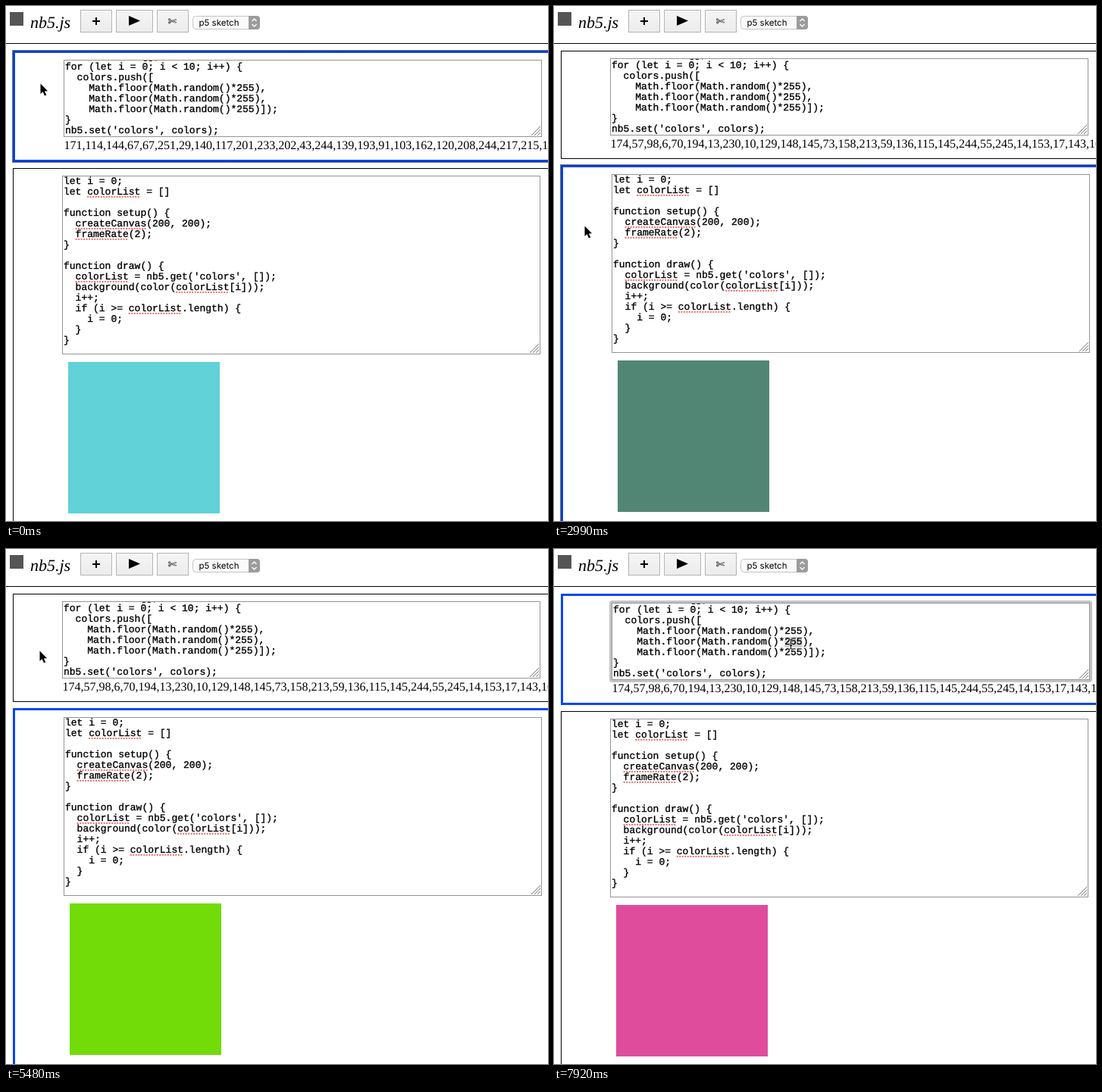
An HTML page with a canvas that plays this animation: 715 by 680 pixels, repeating every 8 s.

```html
<!DOCTYPE html>
<html lang="en">
<head>
<meta charset="utf-8">
<title>nb5.js notebook</title>
<style>
  html, body { margin: 0; width: 100%; height: 100%; overflow: hidden; background: #fff; }
  canvas { display: block; width: 715px; height: 680px; }
</style>
</head>
<body>
<canvas id="stage" width="715" height="680"></canvas>
<script>
const ctx = document.getElementById('stage').getContext('2d');
const LOOP = 8000, CHAR = 7.8, LINE = 14, BLUE = '#0647ee';
const MONO = '13px "Liberation Mono", monospace';

const listCode = `let colors = [];
for (let i = 0; i < 10; i++) {
  colors.push([
    Math.floor(Math.random()*255),
    Math.floor(Math.random()*255),
    Math.floor(Math.random()*255)]);
}
nb5.set('colors', colors);`;

const sketchCode = `let i = 0;
let colorList = []

function setup() {
  createCanvas(200, 200);
  frameRate(2);
}

function draw() {
  colorList = nb5.get('colors', []);
  background(color(colorList[i]));
  i++;
  if (i >= colorList.length) {
    i = 0;
  }
}`;

const oldList = '171,114,144,67,67,251,29,140,117,201,233,202,43,244,139,193,91,103,162,120,208,244,217,215,1';
const newList = '174,57,98,6,70,194,13,230,10,129,148,145,73,158,213,59,136,115,145,244,55,245,14,153,17,143,16';

// Sketch background: start time and colour
const swatches = [
  [0, '#60d2d8'], [50, '#8a8f88'], [560, '#a0798f'], [1060, '#2d60f9'],
  [1480, '#408976'], [2010, '#d0e7cb'], [2520, '#5a9dd3'], [2990, '#528674'],
  [3480, '#b0ec3e'], [3840, '#fff'], [4470, '#9f4c62'], [4960, '#0a53c0'],
  [5480, '#72dc08'], [5960, '#849290'], [6440, '#5a9dd3'], [6940, '#528674'],
  [7430, '#b0ec3e'], [7920, '#de4c9b']
];

// Pointer: time, x, y
const pointerPath = [
  [0, 45, 102], [810, 45, 102], [1360, 163, 22], [2200, 163, 22],
  [2460, 40, 283], [2690, 40, 290], [2980, 40, 290], [3600, 167, 22],
  [4200, 167, 22], [4960, 38, 165], [5090, 38, 165], [5480, 44, 134],
  [6790, 44, 134], [6940, 225, 123], [7100, 305, 122], [7230, 305, 122],
  [7510, 312, 125], [LOOP, 312, 125]
];

const within = (t, from, to) => t >= from && t < to;

function rect(x, y, w, h, fill) {
  ctx.fillStyle = fill;
  ctx.fillRect(x, y, w, h);
}

function frame(x, y, w, h, color, width = 1) {
  ctx.strokeStyle = color;
  ctx.lineWidth = width;
  ctx.strokeRect(x + width / 2, y + width / 2, w - width, h - width);
}

function poly(points, closed = false) {
  ctx.beginPath();
  points.forEach(([x, y]) => ctx.lineTo(x, y));
  if (closed) ctx.closePath();
}

function text(str, x, y, font, color = '#000') {
  ctx.font = font;
  ctx.fillStyle = color;
  ctx.fillText(str, x, y);
}

function button(x, w, pressed) {
  const shade = ctx.createLinearGradient(0, 5, 0, 34);
  shade.addColorStop(0, pressed ? '#a8a8a8' : '#f5f5f5');
  shade.addColorStop(1, pressed ? '#b6b6b6' : '#ececec');
  rect(x, 5, w, 30, shade);
  frame(x, 5, w, 30, pressed ? '#a0a0a0' : '#b4b4b4');
}

function toolbar(pressed) {
  rect(5, 8, 18, 18, '#555');
  text('nb5.js', 32, 29, 'italic 22px "Liberation Serif", serif');
  button(98, 42);
  button(145, 49, pressed);
  button(199, 42);
  rect(114, 19, 10, 2, '#000');
  rect(118, 15, 2, 10, '#000');
  poly([[162, 13], [177, 19.5], [162, 26]], true);
  ctx.fill();
  text('✄', 213.5, 24.5, 'bold 14px "DejaVu Sans", sans-serif');

  ctx.beginPath();
  ctx.roundRect(246.5, 13.5, 88, 17, 4);
  ctx.fillStyle = '#fafafa';
  ctx.fill();
  ctx.strokeStyle = '#c4c4c4';
  ctx.lineWidth = 1;
  ctx.stroke();
  ctx.beginPath();
  ctx.roundRect(320, 13, 15, 18, [0, 4, 4, 0]);
  ctx.fillStyle = '#9c9c9c';
  ctx.fill();
  ctx.strokeStyle = '#fff';
  ctx.lineWidth = 1.4;
  poly([[324.5, 20], [327.5, 17], [330.5, 20]]);
  ctx.stroke();
  poly([[324.5, 24], [327.5, 27], [330.5, 24]]);
  ctx.stroke();
  text('p5 sketch', 254.5, 26, '11.5px Inter, sans-serif');
  rect(0, 49, 715, 1, '#000');
}

function cellBorder(y, h, selected, dotted) {
  frame(9, y, 740, h, selected ? BLUE : '#000', selected ? 3 : 1);
  if (!dotted) return;
  ctx.setLineDash([1, 1]);
  frame(8, y - 1, 742, h + 2, '#000');
  frame(9, y, 740, h, '#001a80');
  ctx.setLineDash([]);
}

function underline(x, y, length) {
  ctx.strokeStyle = '#e2443c';
  ctx.lineWidth = 1.6;
  ctx.setLineDash([2, 1.5]);
  poly([[x, y], [x + length, y]]);
  ctx.stroke();
  ctx.setLineDash([]);
}

function editor(x, y, h, code, baseline, { focused, highlight } = {}) {
  const w = 631;
  if (focused) {
    ctx.beginPath();
    ctx.roundRect(x - 1, y - 1, w + 2, h + 2, 2);
    ctx.strokeStyle = '#c4c4c4';
    ctx.lineWidth = 4;
    ctx.stroke();
  }
  rect(x, y, w, h, '#fff');
  frame(x, y, w, h, '#949494');
  if (highlight) rect(x + 2 + 29 * CHAR, y + 45, 3 * CHAR, LINE, '#d4d4d4');

  ctx.save();
  ctx.beginPath();
  ctx.rect(x + 1, y + 1, w - 2, h - 2);
  ctx.clip();
  code.split('\n').forEach((line, row) => {
    const lineY = y + baseline + row * LINE;
    text(line, x + 2, lineY, MONO);
    ctx.strokeStyle = '#000';
    ctx.lineWidth = 0.35;
    ctx.strokeText(line, x + 2, lineY);
    for (const word of line.matchAll(/colorList|createCanvas|frameRate/g)) {
      underline(x + 2 + word.index * CHAR, lineY + 3, word[0].length * CHAR);
    }
  });
  ctx.restore();

  ctx.strokeStyle = '#777';
  ctx.lineWidth = 1;
  for (const size of [13, 9, 5]) {
    poly([[x + w - 1 - size, y + h - 2], [x + w - 2, y + h - 1 - size]]);
    ctx.stroke();
  }
}

function pointerAt(t) {
  const next = Math.max(1, pointerPath.findIndex(([time]) => time > t));
  const [t0, x0, y0] = pointerPath[next - 1];
  const [t1, x1, y1] = pointerPath[next];
  const p = (t - t0) / (t1 - t0);
  const ease = p * p * (3 - 2 * p);
  return [x0 + (x1 - x0) * ease, y0 + (y1 - y0) * ease];
}

function outlined(color, width) {
  ctx.strokeStyle = color;
  ctx.lineWidth = width;
  ctx.stroke();
}

function pointer(x, y) {
  const overEditor = x > 76 && (within(y, 71, 172) || within(y, 223, 459));
  ctx.save();
  ctx.translate(Math.round(x), Math.round(y));
  if (overEditor) {
    ctx.beginPath();
    for (const side of [-1, 1]) {
      ctx.moveTo(side * 3 + 0.5, -6.5);
      ctx.quadraticCurveTo(0.5, -6.5, 0.5, -4.5);
      ctx.lineTo(0.5, 5.5);
      ctx.quadraticCurveTo(0.5, 7.5, side * 3 + 0.5, 7.5);
    }
    ctx.moveTo(-1, 2.5);
    ctx.lineTo(2, 2.5);
    outlined('rgba(255,255,255,.7)', 2.5);
    outlined('#000', 1);
  } else {
    poly([[0.5, 0.5], [0.5, 14], [3.6, 11.2], [6, 16.5], [8.2, 15.5], [5.9, 10.4], [10, 10.2]], true);
    outlined('#fff', 2);
    ctx.fillStyle = '#000';
    ctx.fill();
  }
  ctx.restore();
}

function draw(t) {
  const firstSelected = !within(t, 2930, 6560);
  const pressed = within(t, 1890, 2010) || within(t, 3720, 3840);
  const firstDotted = t < 1890 || within(t, 6560, 7400);
  const secondDotted = within(t, 2930, 3720);
  const shift = firstSelected ? 0 : 2;

  rect(0, 0, 715, 680, '#fff');
  toolbar(pressed);

  cellBorder(59, firstSelected ? 147 : 143, firstSelected, firstDotted);
  editor(76 - shift, 71 - shift, 102, listCode, -1, { focused: t >= 7400, highlight: t >= 7680 });
  text(t < 2010 ? oldList : newList, 76.5 - shift, 189 - shift, '16px "Liberation Serif", serif');

  cellBorder(firstSelected ? 214 : 210, 520, !firstSelected, secondDotted);
  editor(74 + shift, 224 - shift, 236, sketchCode, 11);
  const swatch = swatches.findLast(([start]) => start <= t)[1];
  rect(82 + shift, 470 - shift, 200, 200, swatch);

  pointer(...pointerAt(t));
}

function tick() {
  draw(performance.now() % LOOP);
  requestAnimationFrame(tick);
}

ctx.textRendering = 'geometricPrecision';
ctx.lineJoin = 'miter';
tick();
</script>
</body>
</html>
```
